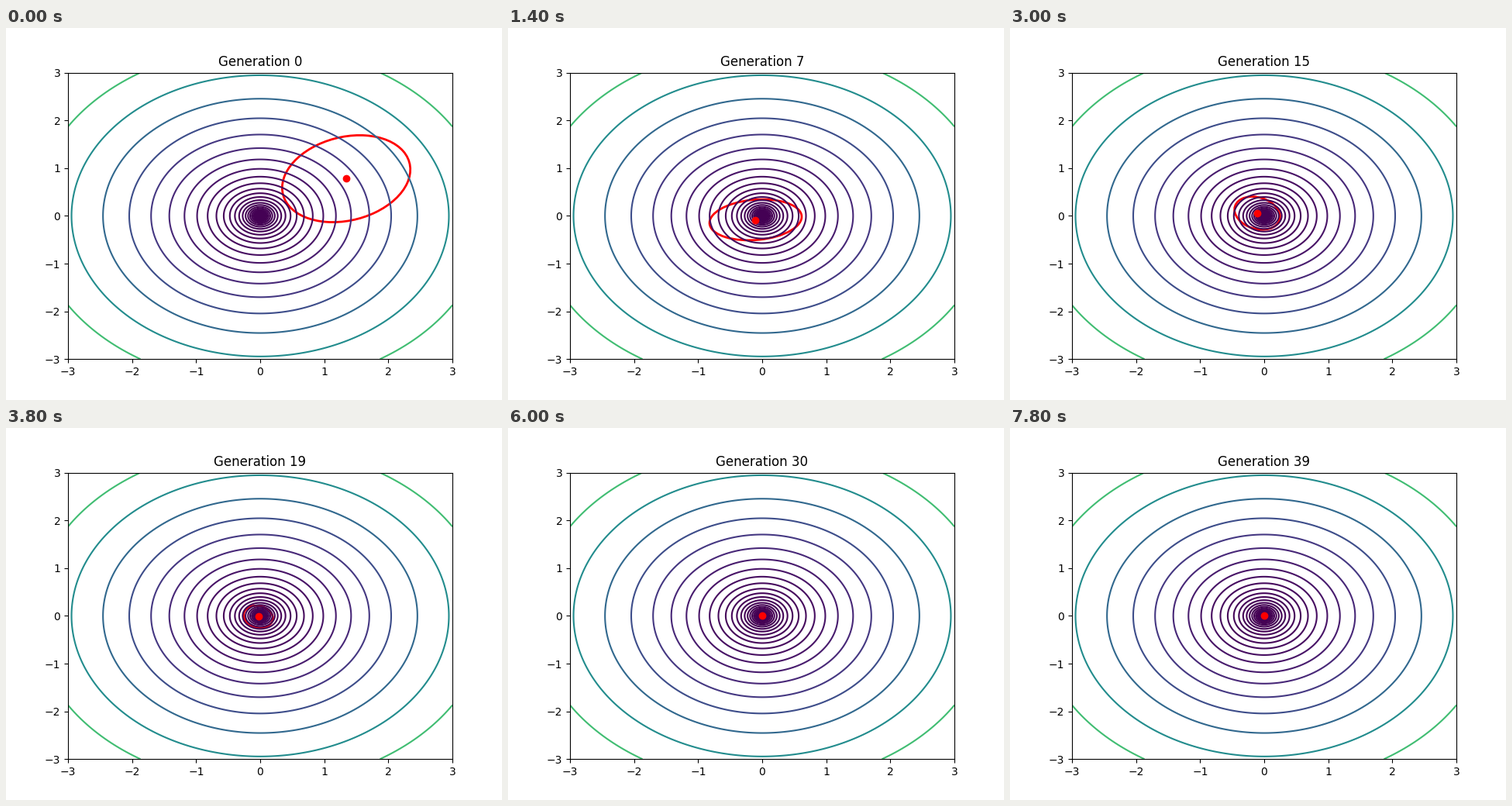
A matplotlib script that plays this animation: 640 by 480 pixels, repeating every 8 s.

```python
import numpy as np
import matplotlib.pyplot as plt
from matplotlib.animation import FuncAnimation
from matplotlib.patches import Ellipse

GENERATIONS = 40
INTERVAL = 200
LIMIT = 3

# Key points of the search: generation, mean x, mean y, correlation
PATH = np.array([
    [0, 1.343, 0.778, 0.21],
    [3, -0.445, -0.340, 0.23],
    [7, -0.103, -0.083, 0.15],
    [11, -0.187, 0.130, -0.29],
    [19, -0.030, -0.016, -0.15],
    [30, 0, 0, 0],
])


def distribution(gen):
    """Mean and covariance of the search in one generation."""
    x, y, rho = (np.interp(gen, PATH[:, 0], col) for col in PATH.T[1:])
    sx = np.exp(-0.0178 * gen**1.5)
    # The ellipse flattens early on, then becomes round again
    sy = sx * (1 - 0.41 * np.exp(-(gen - 6.4)**2 / 27))
    cov = np.array([[sx * sx, rho * sx * sy], [rho * sx * sy, sy * sy]])
    return (x, y), cov


fig, ax = plt.subplots(figsize=(6.4, 4.8), dpi=100)

axis = np.linspace(-LIMIT, LIMIT, 200)
X, Y = np.meshgrid(axis, axis)
Z = X**2 + Y**2
ax.contour(X, Y, Z, levels=np.geomspace(Z.min(), Z.max(), 30), cmap="viridis")

ellipse = Ellipse((0, 0), 1, 1, fill=False, edgecolor="red", linewidth=2, zorder=1)
ax.add_patch(ellipse)
dot = ax.scatter([0], [0], color="red", zorder=3)
ax.set_xlim(-LIMIT, LIMIT)
ax.set_ylim(-LIMIT, LIMIT)
title = ax.set_title("Generation 0")


def update(gen):
    mean, cov = distribution(gen)
    values, vectors = np.linalg.eigh(cov)
    minor, major = 2 * np.sqrt(values)
    ellipse.set_center(mean)
    ellipse.set_width(major)
    ellipse.set_height(minor)
    ellipse.set_angle(np.degrees(np.arctan2(vectors[1, 1], vectors[0, 1])))
    dot.set_offsets([mean])
    title.set_text(f"Generation {gen}")
    return ellipse, dot, title


anim = FuncAnimation(fig, update, frames=GENERATIONS, interval=INTERVAL,
                     repeat=True, repeat_delay=0)
plt.show()
```
